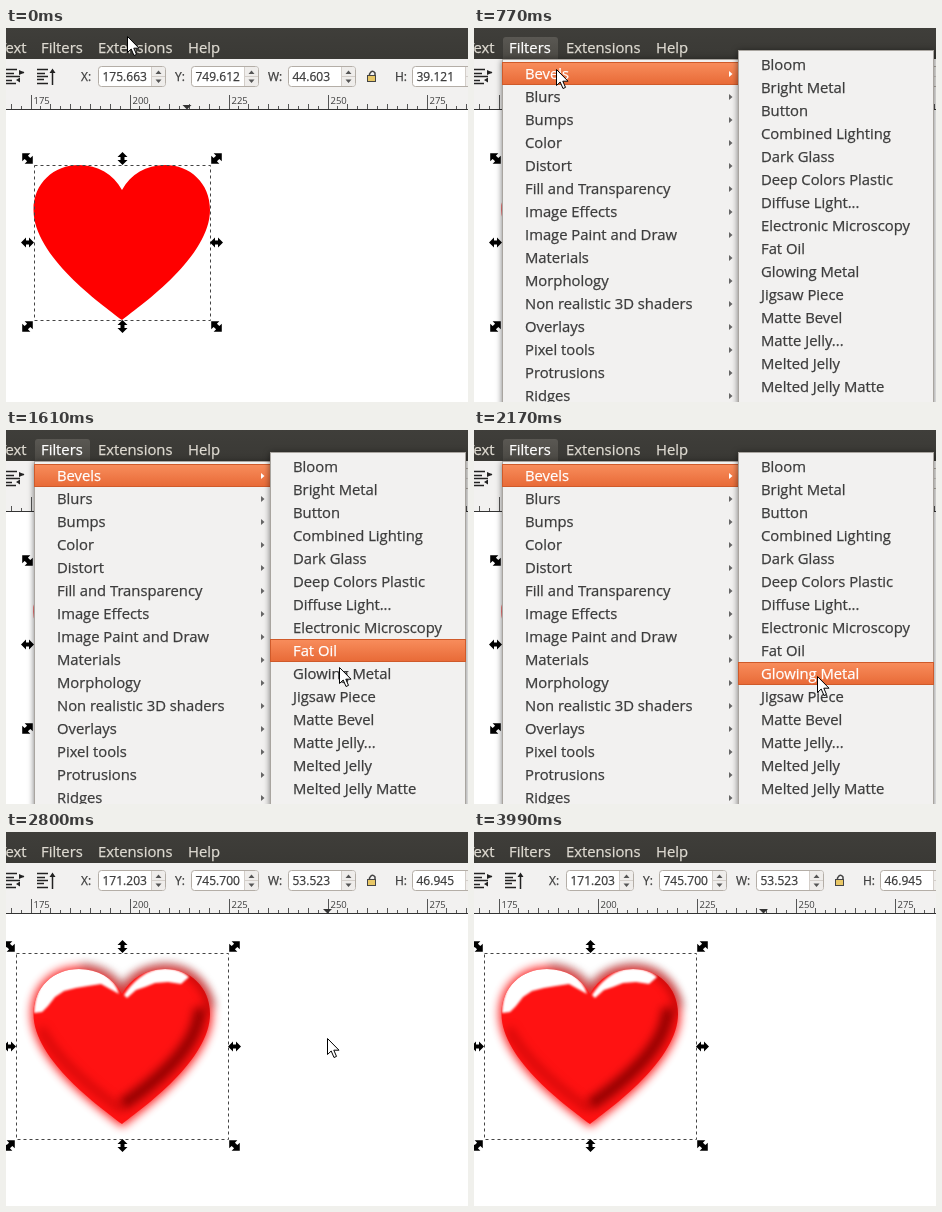
Recreate the animation shown at these times as an HTML page. Size 462x374 px, loop 4.13 s.

```html
<!DOCTYPE html>
<html lang="en">
<head>
<meta charset="utf-8">
<title>Applying a bevel filter</title>
<style>
  html, body { margin: 0; width: 100%; height: 100%; overflow: hidden; background: #fff; }
  svg { display: block; width: 462px; height: 374px; }
  text { font: 14.8px "Open Sans", "Noto Sans", sans-serif; fill: #3c3c3c; stroke: #3c3c3c; stroke-width: .25; white-space: pre; }
  #bar text { fill: #dfdbd2; stroke: #dfdbd2; }
  #tools text { font-size: 12px; }
  #ruler text { font-size: 9.5px; stroke: none; }
  .menu { filter: drop-shadow(0 1px 3px #0008); }
  text.on, #bar text.on { fill: #fff; stroke: #fff; }
</style>
</head>
<body>
<svg viewBox="0 0 462 374">
  <defs>
    <linearGradient id="dark" x2="0" y2="1"><stop stop-color="#3f3e3a"/><stop offset="1" stop-color="#3a3935"/></linearGradient>
    <linearGradient id="tabFill" x2="0" y2="1"><stop stop-color="#5a5853"/><stop offset="1" stop-color="#4b4944"/></linearGradient>
    <linearGradient id="orange" x2="0" y2="1"><stop stop-color="#f88d5c"/><stop offset="1" stop-color="#e86a37"/></linearGradient>
    <filter id="soft" x="-30%" y="-30%" width="160%" height="160%"><feGaussianBlur stdDeviation="5"/></filter>
    <filter id="crisp"><feGaussianBlur stdDeviation=".9"/></filter>
    <path id="heart" d="M116 292C95 276 27.500 228 27.500 182C27.500 155 48 137 73 137C92 137 107 146 116 162C125 146 140 137 159 137C184 137 204 155 204 182C204 228 137 276 116 292Z"/>
    <clipPath id="inside"><use href="#heart"/></clipPath>
    <path id="grip" d="M-6.500 0L-1.500-5V-2H1.500V-5L6.500 0L1.500 5V2H-1.500V5Z"/>
  </defs>
  <rect width="462" height="374" fill="#fff"/>

  <use id="flat" href="#heart" fill="red"/>
  <g id="glossy">
    <use href="#heart" fill="#e00" stroke="#f00" stroke-width="5" opacity=".85" filter="url(#soft)"/>
    <path d="M75 134Q103 136 116 156Q130 136 160 134Q196 136 207 175" fill="none" stroke="#500" stroke-width="5" opacity=".5" filter="url(#soft)"/>
    <use href="#heart" fill="#ff1212"/>
    <g clip-path="url(#inside)" fill="none">
      <path d="M194 176C193 215 150 250 116 273" stroke="#900000" stroke-width="12" filter="url(#soft)"/>
      <path d="M116 278C90 260 50 228 35 196" stroke="#b00000" stroke-width="7" opacity=".6" filter="url(#soft)"/>
      <path d="M181 141Q203 152 204 182" stroke="#800" stroke-width="7" opacity=".6" filter="url(#soft)"/>
      <g fill="#fff" filter="url(#crisp)">
        <path d="M28 181Q29 150 52 138Q75 132 96 140Q110 150 113 162L104 157L95 152L82 154L70 156L58 159L49 165L42 174L36 180Z"/>
        <path d="M118 163Q132 142 151 137Q171 134 183 145L175 152L162 150L149 151L139 155L130 158L121 166Z"/>
      </g>
    </g>
  </g>
  <g id="selection"></g>

  <g id="tools">
    <rect y="31" width="462" height="51" fill="#f2f1f0"/>
    <path d="M0 41.500H11M0 45.500H8M0 48.500H14M0 52.500H6M0 55.500H10M31 41.500H42M31 45.500H39M31 48.500H42M31 51.500H38M31 55.500H42M46.500 43V57M13 44.500H18" stroke="#222" stroke-width="1.500"/>
    <path d="M43.500 45L46.500 40.500L49.500 45ZM13 42L18.500 44.500L13 47ZM10 52L14 49.500V54.500Z" fill="#222"/>
    <path d="M363.500 48V46Q366 41 369 45V48" fill="none" stroke="#444" stroke-width="1.500"/>
    <rect x="361.500" y="47.500" width="8" height="6" fill="#e8c766" stroke="#444"/>
    <g id="fields"></g>
  </g>
  <g id="ruler"><path d="M0 81.500H462" stroke="#333"/></g>
  <path id="marker" d="M-4.500 77H4.500L0 81.500Z" fill="#333"/>

  <g id="bar">
    <rect width="462" height="31" fill="url(#dark)"/>
    <path id="tab" d="M29 31V12Q29 9 32 9H81Q84 9 84 12V31Z" fill="url(#tabFill)"/>
    <text x="20.500" y="25" text-anchor="end">Text</text>
    <text id="filtersLabel" x="35" y="25">Filters</text>
    <text x="92" y="25">Extensions</text>
    <text x="182" y="25">Help</text>
  </g>
  <g id="filters" class="menu"></g>
  <g id="bevels" class="menu"></g>
  <path id="cursor" d="M.5 .5V16.500L4.200 13L7 19.500L9.500 18.400L6.800 12.200H12Z" fill="#fff" stroke="#000"/>
</svg>
<script>
const LOOP = 4130, STEP = 70, ROW = 23;
const OPEN = 350, HOVER = 560, SUBMENU = 770, CLOSE = 2380, APPLY = 2450;
const $ = id => document.getElementById(id);
const show = (id, on) => $(id).style.display = on ? "" : "none";
const place = (id, x, y) => $(id).setAttribute("transform", `translate(${x} ${y})`);

// Pointer path: time, x, y
const path = [
  [0, 121, 8], [140, 102, 12], [280, 72, 18], [350, 68, 18], [420, 68, 18], [490, 68, 26],
  [560, 69, 37], [630, 69, 41], [700, 69, 41], [840, 95, 41], [980, 190, 46], [1050, 240, 54],
  [1120, 276, 90], [1190, 289, 98], [1260, 298, 133], [1540, 326, 220], [1610, 333, 237],
  [1680, 339, 254], [1750, 342, 264], [1820, 342, 264], [2030, 343, 256], [2170, 343, 246],
  [2380, 343, 246], [2520, 338, 237], [2660, 329, 219], [2800, 321, 206], [2940, 318, 206],
  [3080, 318, 206], [3150, 316, 201], [3290, 304, 150], [3430, 289, 82], [3640, 244, -2],
  [3850, 240, -22], [LOOP, 240, -22]
];

function pointer(t) {
  const i = Math.max(1, path.findIndex(p => p[0] >= t));
  const [t0, x0, y0] = path[i - 1], [t1, x1, y1] = path[i];
  const k = (t - t0) / (t1 - t0);
  return [x0 + (x1 - x0) * k, y0 + (y1 - y0) * k];
}

function buildMenu(id, x, y, width, first, items, arrows) {
  let html = `<rect x="${x + .5}" y="${y + .5}" width="${width - 1}" height="400" fill="#f2f1f0" stroke="#a9a5a0"/>
    <rect class="bar" x="${x + .5}" width="${width - 1}" height="22" fill="url(#orange)" stroke="#cf5a2a"/>`;
  items.forEach((name, i) => {
    const top = first + i * ROW;
    html += `<text x="${x + 23}" y="${top + 17}">${name}</text>`;
    if (arrows) html += `<path class="arrow" d="M${x + 227} ${top + 9}l3.500 3l-3.500 3z" fill="#666"/>`;
  });
  $(id).innerHTML = html;
  const bar = $(id).querySelector(".bar");
  const labels = $(id).querySelectorAll("text"), tips = $(id).querySelectorAll(".arrow");
  return row => {
    bar.style.display = row < 0 ? "none" : "";
    bar.setAttribute("y", first + row * ROW + .5);
    labels.forEach((label, i) => label.classList.toggle("on", i === row));
    tips.forEach((tip, i) => tip.setAttribute("fill", i === row ? "#fff" : "#666"));
  };
}

const highlightFilter = buildMenu("filters", 28, 31, 238, 34, ["Bevels", "Blurs", "Bumps", "Color",
  "Distort", "Fill and Transparency", "Image Effects", "Image Paint and Draw", "Materials",
  "Morphology", "Non realistic 3D shaders", "Overlays", "Pixel tools", "Protrusions", "Ridges"], true);
const highlightBevel = buildMenu("bevels", 264, 22, 196, 25, ["Bloom", "Bright Metal", "Button",
  "Combined Lighting", "Dark Glass", "Deep Colors Plastic", "Diffuse Light...", "Electronic Microscopy",
  "Fat Oil", "Glowing Metal", "Jigsaw Piece", "Matte Bevel", "Matte Jelly...", "Melted Jelly",
  "Melted Jelly Matte"]);

function buildRuler() {
  let html = "";
  for (let i = -2; i < 46; i++) {
    const x = Math.floor(25 + i * 9.9) + .5, major = i % 10 === 0;
    html += `<path d="M${x} ${major ? 67 : i % 2 ? 78 : 76}V81" stroke="#555"/>`;
    if (major) html += `<text x="${x + 2}" y="76">${175 + i * 2.5}</text>`;
  }
  $("ruler").innerHTML += html;
}

function setFields(values) {
  const labels = ["X:", "Y:", "W:", "H:"], starts = [75, 169, 262, 389], boxes = [92, 185, 282, 406];
  $("fields").innerHTML = values.map((value, i) => {
    const x = boxes[i];
    return `<text x="${starts[i]}" y="53">${labels[i]}</text>
      <rect x="${x + .5}" y="38.500" width="67" height="20" rx="3" fill="#fff" stroke="#b4aea7"/>
      <path d="M${x + 53.5} 39H${x + 65}Q${x + 67} 39 ${x + 67} 41V56Q${x + 67} 58 ${x + 65} 58H${x + 53.5}Z" fill="#efedeb"/>
      <path d="M${x + 53.5} 39V58M${x + 54} 48.500H${x + 67}" stroke="#d3cec9"/>
      <path d="M${x + 57.5} 46l3-3.500l3 3.500zm0 5.500l3 3.500l3-3.500z" fill="#555"/>
      <text x="${x + 4.5}" y="53">${value}</text>`;
  }).join("");
}

function setSelection(left, top, right, bottom) {
  const xs = [left - 7, 116.5, right + 6], ys = [top - 7, 214.5, bottom + 6];
  let html = `<path d="M${left} ${top}H${right}V${bottom}H${left}Z" fill="none" stroke="#444" stroke-dasharray="3 3"/>`;
  for (let i = 0; i < 3; i++) for (let j = 0; j < 3; j++) {
    if (i === 1 && j === 1) continue;
    const turn = i === 1 ? 90 : j === 1 ? 0 : i === j ? 45 : -45;
    html += `<use href="#grip" transform="translate(${xs[i]} ${ys[j]}) rotate(${turn}) scale(${turn % 90 ? 1.15 : 1})"/>`;
  }
  $("selection").innerHTML = html;
}

let applied;
function setApplied(on) {
  if (on === applied) return;
  applied = on;
  show("flat", !on);
  show("glossy", on);
  setFields(on ? ["171.203", "745.700", "53.523", "46.945"] : ["175.663", "749.612", "44.603", "39.121"]);
  if (on) setSelection(10.5, 121.5, 222.5, 307.5);
  else setSelection(28.5, 137.5, 204.5, 292.5);
}

function draw(t) {
  const [x, y] = pointer(t);
  const open = t >= OPEN && t < CLOSE;
  setApplied(t >= APPLY);
  show("tab", open);
  $("filtersLabel").classList.toggle("on", open);
  show("filters", open);
  show("bevels", open && t >= SUBMENU);
  highlightFilter(t >= HOVER ? 0 : -1);
  // The highlight trails the pointer slightly.
  const [hx, hy] = pointer(Math.max(0, t - 30));
  highlightBevel(hx > 264 ? Math.floor((hy - 25) / ROW) : -1);
  place("cursor", Math.round(x), Math.round(y));
  place("marker", t < CLOSE ? 181 : Math.max(289.5, Math.round(x) + .5), 0);
}

buildRuler();
const start = performance.now();
function tick() {
  const t = (performance.now() - start) % LOOP;
  draw(Math.floor(t / STEP) * STEP);
  requestAnimationFrame(tick);
}
tick();
</script>
</body>
</html>
```
